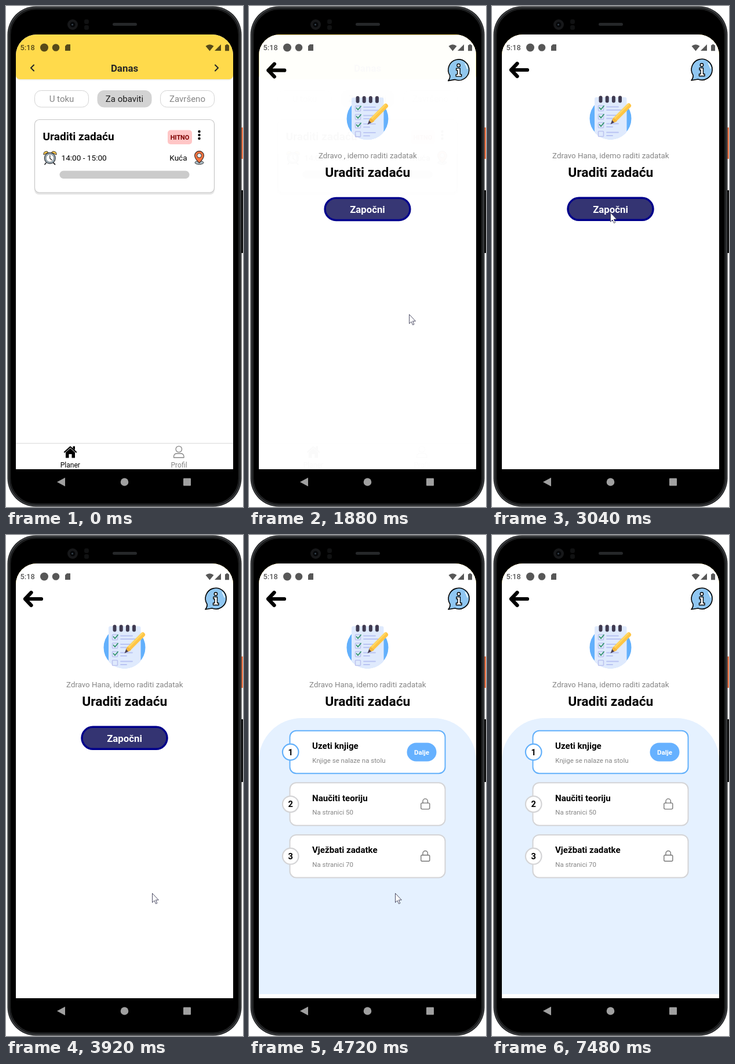
Recreate the animation shown at these times as an HTML page. Size 409 px wide and 862 px high, loop 7.92 s.

```html
<!DOCTYPE html>
<html lang="bs">
<head>
<meta charset="utf-8">
<title>Planer</title>
<style>
html, body { margin: 0; width: 100%; height: 100%; overflow: hidden; background: #fff; }
svg { display: block; width: 409px; height: 862px; font-family: Roboto, Arial, sans-serif; }
</style>
</head>
<body>
<svg id="stage" viewBox="0 0 409 862"></svg>
<script>
const LOOP = 7920, STEP = 40;
const stage = document.getElementById('stage');

const label = (x, y, size, str, { fill = '#000', weight = 400, anchor = 'start', id = '' } = {}) =>
  `<text ${id && `id="${id}"`} x="${x}" y="${y}" font-size="${size}" font-weight="${weight}" fill="${fill}" text-anchor="${anchor}">${str}</text>`;
const bold = (x, y, size, str, more) => label(x, y, size, str, { weight: 700, ...more });
const box = (x, y, w, h, r, attrs) => `<rect x="${x}" y="${y}" width="${w}" height="${h}" rx="${r}" ${attrs}/>`;
const dot = (x, y, r, attrs) => `<circle cx="${x}" cy="${y}" r="${r}" ${attrs}/>`;
const path = (d, attrs = '') => `<path d="${d}" ${attrs}/>`;
const line = (d, color, width) => path(d, `fill="none" stroke="${color}" stroke-width="${width}" stroke-linecap="round" stroke-linejoin="round"`);

const phone = () =>
  box(404, 209, 6, 54, 1, 'fill="#f47d50"') +
  box(404, 317, 6, 108, 1, 'fill="#111"') +
  box(2.5, .5, 404, 861, 49, 'fill="#17181a"') +
  box(4.5, 2.5, 400, 857, 47, 'fill="none" stroke="#414345" stroke-width="1.800"') +
  box(7.5, 5.5, 394, 851, 44, 'fill="#000" stroke="#1f2021" stroke-width="1.500"') +
  dot(115, 32, 9, 'fill="#17181a"') + dot(115, 32, 4.5, 'fill="#050608"') + dot(114.5, 32, 1.6, 'fill="#33404b"') +
  box(135, 23, 8, 8, 3, 'fill="#101112"') + box(135, 33, 8, 8, 3, 'fill="#101112"') +
  box(184, 29, 42, 5, 2.5, 'fill="#252729"');

const statusBar = () => `<g fill="#000" opacity=".66">` +
  label(24.5, 76, 12.8, '5:18', { weight: 500 }) +
  dot(66, 71.5, 7, '') + dot(86, 71.5, 6.3, '') +
  path('M105 66H111V77H102V69Z') +
  path('M344.5 69Q351.5 63.5 358.5 69L351.5 77.5Z') +
  path('M371 66V77H360Z') +
  path('M380 66H383V67.2H385V77.3H378V67.2H380Z') + '</g>';

const navBar = () => `<g fill="#a0a0a0">` +
  path('M88 819L102 811.5V826.5Z') + dot(204.5, 819, 6.8, '') + box(306, 812.5, 13, 13, 1, '') + '</g>';

const pill = (x, w, str, active) =>
  box(x, 145.5, w, 28.5, 11, `fill="${active ? '#d3d3d3' : '#fff'}" stroke="#d3d3d3"`) +
  label(x + w / 2, 165.2, 15, str, { fill: active ? '#1d1d1d' : '#858585', anchor: 'middle' });

const alarmClock = () =>
  line('M69 270L67 272.5M82 270L84.500 272.500', '#2b2d31', 1.8) +
  path('M65 256Q64 250 71 250L73 252Z', 'fill="#ffc94a" stroke="#33302b"') +
  path('M87 256Q88 250 80.500 250L78.500 252Z', 'fill="#ffc94a" stroke="#33302b"') +
  dot(75.8, 261.8, 9.4, 'fill="#a9bdc9" stroke="#2b2d31" stroke-width="1.2"') +
  dot(75.8, 261.8, 6.8, 'fill="#fff" stroke="#4a5258" stroke-width=".8"') +
  line('M75.8 257V262L79 265', '#222', 1.2);

const pin = () =>
  `<ellipse cx="333.500" cy="269.500" rx="7.500" ry="3" fill="#a9bbc5" stroke="#333"/>` +
  path('M333.500 270Q325.600 262.500 325.600 257.500A7.900 7.900 0 0 1 341.400 257.500Q341.400 262.500 333.500 270Z',
    'fill="#f4733f" stroke="#3a2a24" stroke-width="1.1"') +
  dot(333.5, 257.3, 3.8, 'fill="#e9eef0" stroke="#3a2a24"');

const listPage = () => box(17, 49, 375, 748, 0, 'fill="#fff"') +
  box(17, 40, 375, 87.5, 7, 'fill="#000" opacity=".08"') +
  box(17, 40, 375, 86, 7, 'fill="#ffda4b"') +
  line('M48 101.500L43 106.500L48 111.500M361 101.500L366 106.500L361 111.500', '#262626', 2) +
  bold(204.5, 112.8, 16.9, 'Danas', { anchor: 'middle', fill: '#262626' }) +
  pill(49.5, 93, 'U toku') + pill(158, 93, 'Za obaviti', true) + pill(266.5, 93, 'Završeno') +
  box(49, 197, 311, 127.5, 8, 'fill="#000" opacity=".1"') +
  box(49.5, 195.5, 310, 125.5, 8, 'fill="#fff" stroke="#c6c6c6" stroke-width="1.2"') +
  `<g id="task">` + bold(63.5, 231, 19.1, 'Uraditi zadaću') +
  box(279, 213.5, 42, 24.5, 5, 'fill="#ffc6c6"') + bold(300, 230, 10.9, 'HITNO', { fill: '#800000', anchor: 'middle' }) +
  [216, 222, 228].map(y => dot(333.5, y, 2.2, '')).join('') +
  alarmClock() + label(95.5, 266.3, 13.6, '14:00 - 15:00') + label(312.5, 266.3, 13.5, 'Kuća', { anchor: 'end' }) + pin() +
  box(92.5, 283.5, 224, 13.5, 6.7, 'fill="#cbcbcb"') + '</g>' +
  path('M17 752.500H392', 'stroke="#e2e2e2" stroke-width="1.500"') +
  path('M103 768L111 761L119 768V777.500H113.500V771H108.500V777.500H103Z') +
  line('M101 767.500L111 758.500L121 767.500', '#000', 2.2) + path('M115.500 757.500H119V764L115.500 761Z') +
  label(110.8, 794, 12.1, 'Planer', { anchor: 'middle' }) +
  dot(298.3, 762.5, 5.2, 'fill="none" stroke="#858585" stroke-width="1.300"') +
  line('M289.500 777V775Q290 770 295 770H301.500Q306.500 770 307 775V777Z', '#858585', 1.3) +
  label(298.5, 794, 12.1, 'Profil', { anchor: 'middle', fill: '#858585' });

const checkRow = (y, i) =>
  box(183.5, y - 4.5, 9, 9, 1, 'fill="none" stroke="#bcc3ef" stroke-width="1.600"') +
  (i < 3 ? line(`M185.500 ${y - 1}L188 ${y + 2}L193 ${y - 4}`, '#31936b', 1.8) : '') +
  line(`M198 ${y - 2.5}H218M198 ${y + 3}H${i ? 208 : 224}`, '#b9c4f3', 1.8);

const notepad = () => dot(204.5, 193.5, 36, 'fill="#62b0fc"') +
  `<g clip-path="url(#pad)">` + box(177, 157, 55.5, 80, 3, 'fill="#dfeafd"') + '</g>' +
  [187.5, 198.7, 209.9, 221].map(x => box(x - 3, 154.5, 6, 12, 3, 'fill="#403b51"')).join('') +
  [176, 190.5, 205, 220].map(checkRow).join('') +
  path('M204.500 203.500L208 194.500L213 199.500Z', 'fill="#4b4054"') +
  line('M212 195.500L236 171.500', '#ffc545', 8) + line('M210.500 194L235 169.500', '#ffd761', 3) +
  path('M207.500 196.500L210 192L216 198L211 200.500Z', 'fill="#f4b73e"');

const infoIcon = () =>
  path('M347 119A18 18 0 1 1 355.500 126L344 128Q347.500 124 347 119Z', 'fill="#8fc6f1" stroke="#000" stroke-width="1.600" stroke-linejoin="round"') +
  path('M373.500 99Q376.500 103 377 107', 'fill="none" stroke="#fff" stroke-width="1.500" stroke-linecap="round"') +
  dot(362, 101.5, 2.7, 'fill="#fff" stroke="#000" stroke-width="1.400"') +
  path('M358 106.500H364.500V117H367V120.500H357.500V117H360V110H358Z', 'fill="#fff" stroke="#000" stroke-width="1.400" stroke-linejoin="round"');

const lock = y => box(296.8, y - 2, 15, 10.5, 2, 'fill="none" stroke="#777" stroke-width="1.400"') +
  line(`M300 ${y - 2}V${y - 5}A4.200 4.200 0 0 1 308.400 ${y - 5}V${y - 2}`, '#777', 1.4);

const stepCard = ([title, note], i) => {
  const y = 336.7 + 89.6 * i, mid = y + 36.8, color = i ? '#d4d4d6' : '#62b0fb';
  return box(70.5, y, 268, 73.5, 11, `fill="#fff" stroke="${color}" stroke-width="2"`) +
    dot(71.7, mid, 13.8, `fill="#fff" stroke="${color}" stroke-width="2.200"`) +
    bold(71.7, mid + 5.2, 14.6, i + 1, { anchor: 'middle' }) +
    bold(109, y + 31.5, 15.1, title) + label(109.3, y + 54.8, 11.5, note, { fill: '#858585' }) +
    (i ? lock(mid) : box(272.5, 357.5, 51, 32, 16, 'fill="#66b1ff"') +
      bold(298, 377.6, 11.6, 'Dalje', { fill: '#fff', anchor: 'middle' }));
};

const taskPage = () => box(17, 49, 375, 748, 0, 'fill="#fff"') +
  line('M61 110H33M43.500 99L33 110L43.500 121', '#000', 6.2) + infoIcon() + notepad() +
  label(204.8, 262, 13.3, '', { fill: '#858585', anchor: 'middle', id: 'greeting' }) +
  bold(204.8, 294, 22.8, 'Uraditi zadaću', { anchor: 'middle' }) +
  `<g id="start">` + box(131, 330.3, 147, 38, 19, 'fill="#343472" stroke="#00008b" stroke-width="3.500"') +
  bold(204.5, 356, 16.8, 'Započni', { fill: '#fff', anchor: 'middle' }) + '</g>' +
  `<g id="sheet">` + path('M17 790V388A74 73 0 0 1 91 315H318A74 73 0 0 1 392 388V790Z', 'fill="#e5f1ff"') +
  `<g id="cards">` + [['Uzeti knjige', 'Knjige se nalaze na stolu'], ['Naučiti teoriju', 'Na stranici 50'],
    ['Vježbati zadatke', 'Na stranici 70']].map(stepCard).join('') + '</g></g>';

stage.innerHTML = `<defs>
  <clipPath id="screen"><path d="M17 797V85A36 36 0 0 1 53 49H356A36 36 0 0 1 392 85V797Z"/></clipPath>
  <clipPath id="pad"><path d="M168 150H241V193.500A36.500 36.500 0 0 1 168 193.500Z"/></clipPath></defs>` +
  phone() + `<g clip-path="url(#screen)"><g id="list">${listPage()}</g><g id="detail">${taskPage()}</g>${statusBar()}</g>` +
  navBar() + `<g id="cursor">` + dot(0, 0, 15, 'id="press" fill="#ffff3c"') +
  path('M.5 .5V16.300L4 13L6.500 18.500L8.800 17.500L6.400 12H11.300Z',
    'fill="#fff" stroke="#2c2c48" stroke-width=".850" stroke-linejoin="round"') + '</g>';

const el = Object.fromEntries([...stage.querySelectorAll('[id]')].map(node => [node.id, node]));
const clamp = v => Math.max(0, Math.min(1, v));
const progress = (t, from, to) => clamp((t - from) / (to - from));
const smooth = p => p * p * (3 - 2 * p);
const easeOut = p => 1 - (1 - p) ** 2;
const within = (t, from, to) => t >= from && t < to;
const show = (node, on) => node.setAttribute('visibility', on ? 'visible' : 'hidden');
const fade = (node, v) => node.setAttribute('opacity', v);

// time, x, y of the pointer tip
const route = [
  [640, 397, 843], [800, 174, 346], [1080, 174, 346], [1320, 191, 239], [1560, 191, 239],
  [1960, 286, 564], [2280, 286, 564], [2680, 307, 251], [3080, 201, 358], [3680, 201, 358],
  [3920, 252, 616], [7200, 252, 616], [7240, 254, 621], [7440, 371, 72]
];

function pointer(t) {
  const i = Math.max(1, route.findIndex(k => k[0] >= t));
  const [t0, x0, y0] = route[i - 1], [t1, x1, y1] = route[i];
  const p = smooth(progress(t, t0, t1));
  return [x0 + (x1 - x0) * p, y0 + (y1 - y0) * p];
}

// touch feedback: dims to 20 %, then recovers
const touch = (t, down, up, dimTime) =>
  1 - .8 * smooth(progress(t, down, down + dimTime)) * (1 - smooth(progress(t, up, up + 160)));

function render(t) {
  const visible = within(t, 640, 7480);
  show(el.cursor, visible);
  if (visible) el.cursor.setAttribute('transform', `translate(${pointer(Math.min(t, 7440))})`);
  fade(el.press, within(t, 1320, 1520) || within(t, 3600, 3680) ? .68 : 0);

  fade(el.task, touch(t, 1320, 1520, 140));
  const enter = easeOut(progress(t, 1640, 1920)), scale = .9 + .1 * enter;
  fade(el.detail, enter);
  el.detail.setAttribute('transform', `translate(204.5 423) scale(${scale}) translate(-204.5 -423)`);
  el.greeting.textContent = `Zdravo ${t < 2240 ? '' : 'Hana'}, idemo raditi zadatak`;

  fade(el.start, t < 4240 ? touch(t, 3560, 3720, 120) : 0);
  const rise = easeOut(progress(t, 4200, 4711));
  fade(el.sheet, t < 4240 ? 0 : 1);
  el.sheet.setAttribute('transform', `translate(0 ${482 * (1 - rise)})`);
  fade(el.cards, progress(t, 4440, 4640));
}

function tick() {
  const t = performance.now() % LOOP;
  render(Math.floor(t / STEP) * STEP);
  requestAnimationFrame(tick);
}
tick();
</script>
</body>
</html>
```
